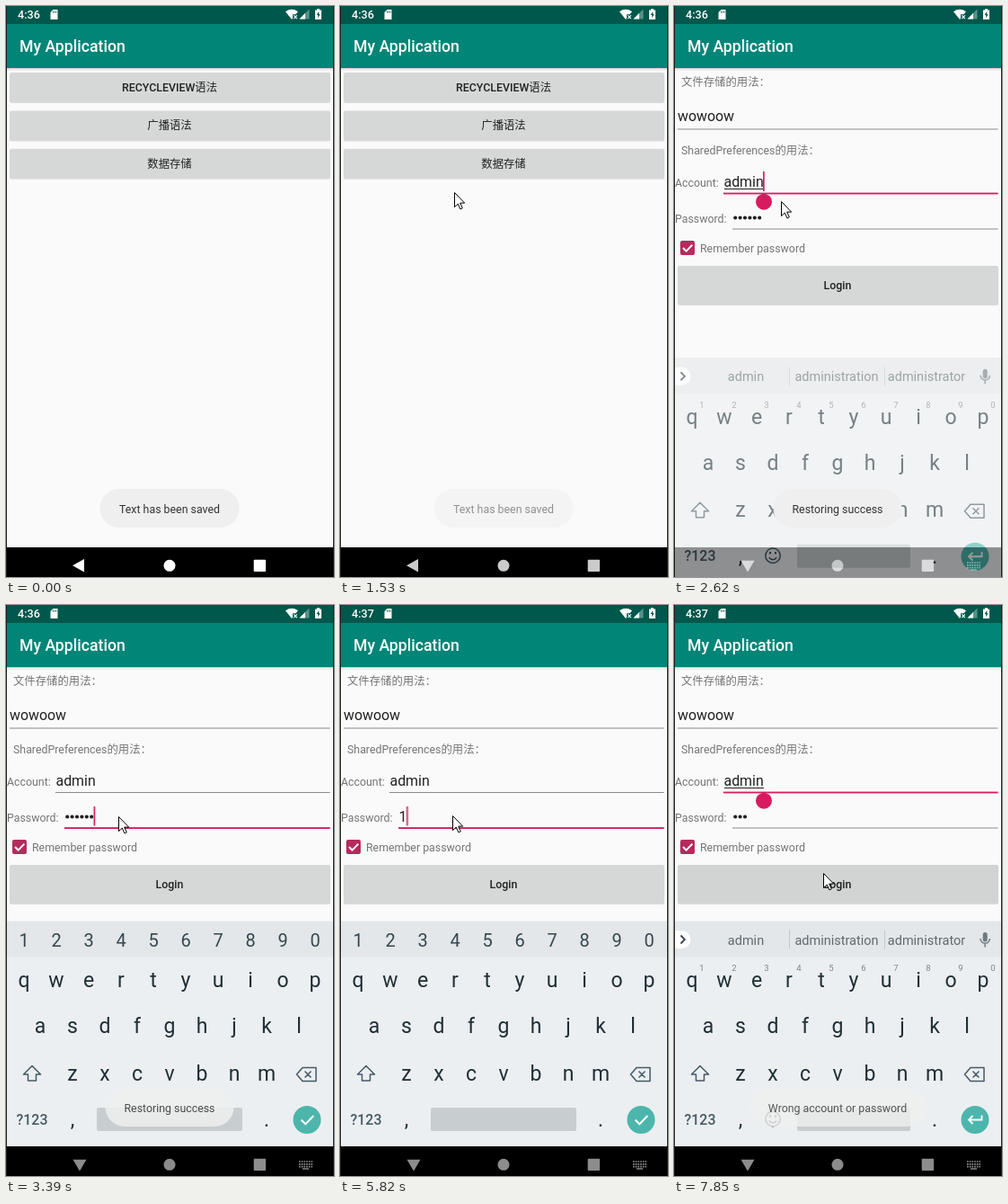
Recreate the animation shown at these times as an HTML page. Size 365 px wide and 635 px high, loop 8000 ms.

```html
<!DOCTYPE html>
<html lang="zh">
<head>
<meta charset="utf-8">
<title>Login form</title>
<style>
html, body { margin: 0; width: 365px; height: 635px; overflow: hidden; background: #000; }
svg { display: block; }
text { font: 12.36px Roboto, "Noto Sans CJK SC", "Noto Sans CJK JP", "Noto Sans CJK", sans-serif; fill: #212121; white-space: pre; }
.mid { text-anchor: middle; }
.med { font-weight: 500; }
.label { fill: #757575; }
.input { font-size: 15.9px; }
.title { font-size: 17.66px; font-weight: 500; fill: #fff; }
.clock { font-size: 12.6px; font-weight: 500; fill: #fff; }
.key { font-size: 23px; fill: #1f2f36; text-anchor: middle; }
.num { font-size: 20px; fill: #37474f; text-anchor: middle; }
.hint { font-size: 9.5px; fill: #78878e; text-anchor: middle; }
.word { font-size: 14.5px; fill: #5f6a6f; text-anchor: middle; }
.mode { font-size: 15.9px; font-weight: 500; fill: #455a64; text-anchor: middle; }
.pink { fill: #d81b60; }
.rule { fill: #8a8a8a; }
.icon { fill: none; stroke: #455a64; stroke-width: 1.5; stroke-linejoin: round; }
.toast rect { fill: #efefef; }
.toast text { fill: #333; text-anchor: middle; }
</style>
</head>
<body>
<svg width="365" height="635" viewBox="0 0 365 635">
  <defs>
    <g id="bar">
      <rect y="20" width="365" height="582" fill="#fafafa"/>
      <rect y="69" width="365" height="1" opacity=".16"/>
      <rect y="70" width="365" height="2" opacity=".05"/>
      <rect y="20" width="365" height="49" fill="#008577"/>
      <text class="title" x="15" y="51">My Application</text>
    </g>
    <path id="grip" class="pink" d="M0 0L6.3 3.2A9 9 0 1 1 -6.3 3.2Z"/>
  </defs>

  <g id="home">
    <use href="#bar"/>
    <g id="menu"></g>
    <rect id="menuPress" x="4" y="159" width="357" height="33" rx="2" opacity="0"/>
  </g>

  <g id="login">
    <use href="#bar"/>
    <text class="label" x="8" y="89">文件存储的用法：</text>
    <text class="input" x="4" y="128">wowoow</text>
    <rect class="rule" x="4" y="136.5" width="356.5" height="1"/>
    <text class="label" x="8" y="164.5">SharedPreferences的用法：</text>

    <text class="label" x="1" y="201">Account:</text>
    <text class="input" x="55.5" y="201">admin</text>
    <rect class="rule" x="55" y="208" width="305.5" height="1"/>
    <rect id="accFocus" class="pink" x="55" y="207.6" width="305.5" height="1.8"/>

    <text class="label" x="1" y="241">Password:</text>
    <path d="M68.2 235.5h27.1" fill="none" stroke="#212121" stroke-width="4.2" stroke-linecap="round" stroke-dasharray="0 5.4"/>
    <rect id="cover" y="229" width="50" height="14" fill="#fafafa"/>
    <g id="digit"><text id="digitPos" class="input" y="241">1</text></g>
    <rect class="rule" x="65" y="247.5" width="295.5" height="1"/>
    <rect id="pwFocus" class="pink" x="65" y="247.2" width="295.5" height="1.8"/>
    <g id="pwCaret"><rect id="pwCaretPos" class="pink" x="-.4" y="224" width="1.7" height="21.5"/></g>

    <rect x="7" y="261" width="16" height="16" rx="2" fill="#b52b5e"/>
    <path d="M10 269l3.6 3.6 6.8-7" fill="none" stroke="#fff" stroke-width="2"/>
    <text class="label" x="29" y="274">Remember password</text>

    <rect x="4" y="290" width="357" height="43" rx="2" opacity=".13"/>
    <rect x="4" y="289" width="357" height="42.5" rx="2" fill="#d6d7d7"/>
    <text class="mid med" x="182" y="314.5">Login</text>
    <rect id="loginPress" x="4" y="289" width="357" height="42.5" rx="2" opacity="0"/>

    <g id="accEdit">
      <rect x="56" y="203" width="44" height="1" fill="#212121"/>
      <use href="#grip" x="100" y="208"/>
    </g>
    <rect id="accCaret" class="pink" x="99" y="184" width="1.7" height="22"/>
    <g id="pwGrip"><use href="#grip" x="98" y="247.5"/></g>
  </g>

  <rect width="365" height="20" fill="#00574b"/>
  <text id="early" class="clock" x="13" y="14">4:36</text>
  <text id="late" class="clock" x="13" y="14">4:37</text>
  <g fill="#fff">
    <path d="M52.5 4H57.5V15H49.5V7Z"/>
    <path d="M52.5 5.5v2.2M54.2 5.5v2.2M55.9 5.5v2.2" stroke="#00574b" stroke-width=".8"/>
    <path d="M311 6.2Q318 1.5 325 6.2L322.6 9.2H319V13.8L318 15Z"/>
    <path d="M320.3 10.3l3.6 3.8M323.9 10.3l-3.6 3.8" stroke="#fff" stroke-width="1.1"/>
    <path d="M326.5 14.5L337.5 3.5V14.5Z" opacity=".35"/>
    <path d="M326.5 14.5L333 8V14.5Z"/>
    <path d="M344 4.6H346V3.2H349V4.6H351V15H344Z"/>
    <path d="M348.2 6L345.6 10H347.2V13.2L349.6 9.2H348.2Z" fill="#00574b"/>
  </g>

  <rect y="602" width="365" height="33"/>
  <g id="nav" fill="#fff">
    <path id="back" d="M74 622.3L87 615V629.6Z"/>
    <g id="down">
      <path d="M74.5 616.8H89.5L82 629.4Z"/>
      <path d="M326 619H341M326 621.8H341M326 624.6H341" fill="none" stroke="#fff" stroke-width="1.7" stroke-dasharray="1.7 1"/>
      <path d="M330 627h7" stroke="#fff" stroke-width="1.4"/>
    </g>
    <circle cx="182" cy="622.3" r="6.5"/>
    <rect x="275.7" y="615.7" width="13.4" height="13.4" rx="1"/>
  </g>

  <g id="keyboard">
    <rect y="352" width="365" height="250" fill="#eceff1"/>
    <rect y="351.5" width="365" height="40" fill="#e3e7e9"/>
    <g id="letters"></g>
    <path class="icon" d="M29 512.5L38.5 522H33.5V529H24.5V522H19.5Z"/>
    <path class="icon" d="M330 514.5H345V529.5H330L323.5 522ZM332.5 518.5l7 7M339.5 518.5l-7 7"/>
    <circle cx="335" cy="572.5" r="15.5" fill="#4db6ac"/>
    <g id="textKeys">
      <path d="M0 362H8.5A10 10 0 0 1 8.5 382H0Z" fill="#fff"/>
      <path d="M7.5 367.5l4.5 4.5-4.5 4.5" fill="none" stroke="#37474f" stroke-width="1.8"/>
      <path d="M128.5 361.5v21M234.5 361.5v21" stroke="#c3c9cc"/>
      <g id="words"></g>
      <rect x="343.7" y="364" width="5" height="10.5" rx="2.5" fill="#6f7b80"/>
      <path d="M341 371a5.2 5.2 0 0 0 10.4 0M346.2 376.5v4" fill="none" stroke="#6f7b80" stroke-width="1.5"/>
      <circle class="icon" cx="110" cy="571.5" r="8.2"/>
      <path class="icon" d="M105.8 573.5q4.2 5.2 8.4 0"/>
      <path d="M107 567.2v2.6M113 567.2v2.6" stroke="#455a64" stroke-width="2"/>
      <rect x="137" y="559" width="126" height="26" rx="2" fill="#c8cdcf"/>
      <path d="M342.5 567.5V572.5H328M332.5 568l-4.5 4.5 4.5 4.5" fill="none" stroke="#fff" stroke-width="1.8"/>
    </g>
    <g id="numKeys">
      <rect x="101" y="559" width="162" height="26" rx="2" fill="#c8cdcf"/>
      <path d="M328.5 572.5l4.8 4.8 9-9.3" fill="none" stroke="#fff" stroke-width="2"/>
    </g>
  </g>

  <path d="M.5 0V635M364.5 0V635" stroke="#1c1c1c"/>

  <g id="saved" class="toast"><rect x="104.5" y="537" width="155" height="43" rx="21.5"/><text x="182" y="563.5">Text has been saved</text></g>
  <g id="restored" class="toast"><rect x="110.5" y="537" width="143" height="43" rx="21.5"/><text x="182" y="563.5">Restoring success</text></g>
  <g id="wrong" class="toast"><rect x="83.5" y="537" width="197" height="43" rx="21.5"/><text x="182" y="563.5">Wrong account or password</text></g>

  <g id="mouse">
    <circle id="tap" r="15" fill="#ff0" opacity=".5"/>
    <path d="M.5 .5V16.6L4.3 13.1 6.9 18.9 9.3 17.8 6.7 12.1H11.7Z" fill="#fff" stroke="#000"/>
  </g>
</svg>
<script>
const LOOP = 8000;
const fill = (id, html) => document.getElementById(id).insertAdjacentHTML('beforeend', html);
const label = (cls, x, y, s) => `<text class="${cls}" x="${x}" y="${y}">${s}</text>`;
const row = (cls, x, y, chars) => [...chars].map((c, i) => label(cls, x + 36 * i, y, c)).join('');

fill('menu', ['RECYCLEVIEW语法', '广播语法', '数据存储'].map((s, i) => {
  const y = 74 + 42.4 * i;
  const styled = s.replace(/[A-Z]+/, m => `<tspan class="med">${m}</tspan>`);
  return `<rect x="4" y="${y + 1}" width="357" height="33" rx="2" opacity=".13"/>
    <rect x="4" y="${y}" width="357" height="32.5" rx="2" fill="#d6d7d7"/>` + label('mid', 182, y + 21, styled);
}).join(''));

fill('letters', row('key', 20, 425, 'qwertyuiop') + row('key', 38, 476, 'asdfghjkl') +
  row('key', 74, 528.5, 'zxcvbnm') + label('mode', 29, 577.5, '?123') +
  label('key', 74, 580, ',') + label('key', 290, 580, '.'));
fill('words', label('word', 80, 377.5, 'admin') + label('word', 181, 377.5, 'administration') +
  label('word', 281, 377.5, 'administrator') + row('hint', 31, 407, '1234567890'));
fill('numKeys', row('num', 20, 380, '1234567890'));

// Keyframes are keyed by milliseconds.
let css = '';
function track(id, ease, keys) {
  const body = Object.entries(keys).map(([ms, rule]) => `${ms / LOOP * 100}%{${rule}}`).join('');
  css += `@keyframes ${id}{${body}}#${id}{animation:${id} ${LOOP}ms ${ease} infinite}`;
}
const map = (keys, fn) => Object.fromEntries(Object.entries(keys).map(([ms, v]) => [ms, fn(v)]));
const fade = (id, keys) => track(id, 'linear', map(keys, v => `opacity:${v}`));
const jump = (id, keys) => track(id, 'step-end', map(keys, x => `transform:translateX(${x}px)`));
// Hidden at first; every time given flips the visibility.
function show(id, ...times) {
  const keys = { 0: 'visibility:hidden' };
  times.forEach((ms, i) => keys[ms] = `visibility:${i % 2 ? 'hidden' : 'visible'}`);
  track(id, 'step-end', keys);
}

track('login', 'ease-out', {
  0: 'opacity:0;transform:translateY(24px)', 1640: 'opacity:0;transform:translateY(24px)',
  2000: 'opacity:1;transform:none', 8000: 'opacity:1;transform:none'
});
track('keyboard', 'linear', {
  0: 'opacity:0;transform:translateY(56px)', 2500: 'opacity:0;transform:translateY(56px)',
  2620: 'opacity:.6;transform:translateY(40px)', 2780: 'opacity:1;transform:none',
  8000: 'opacity:1;transform:none'
});
track('mouse', 'ease-in-out', map({
  0: [303, 640], 70: [303, 632], 840: [130, 175], 1300: [130, 175], 1530: [127, 207],
  1800: [127, 207], 2120: [119, 198], 2300: [119, 198], 2620: [119, 217], 2900: [125, 235],
  5580: [125, 235], 5660: [125, 234], 6370: [125, 234], 6680: [142, 191], 7200: [142, 191],
  7410: [166, 298], 8000: [166, 298]
}, ([x, y]) => `transform:translate(${x}px,${y}px)`));
show('tap', 1080, 1230, 2150, 2240, 2960, 3080, 6690, 6830, 7410, 7530);

fade('saved', { 0: 1, 1390: 1, 1690: 0, 8000: 0 });
fade('restored', { 0: 0, 1950: 0, 2250: 1, 3350: 1, 3640: 0, 8000: 0 });
fade('wrong', { 0: 0, 7640: 0, 7850: .8, 8000: .8 });
fade('menuPress', { 0: 0, 1080: 0, 1200: .1, 1300: .1, 1520: 0, 8000: 0 });
fade('loginPress', { 0: 0, 7410: 0, 7530: .1, 7850: .015, 8000: .015 });
fade('nav', { 0: 1, 70: 1, 1530: .8, 2620: .75, 3000: .55, 8000: .55 });
show('back', 0, 2540);
show('down', 2540);
show('early', 0, 4600);
show('late', 4600);
show('textKeys', 0, 3200, 6900);
show('numKeys', 3200, 6900);

show('accFocus', 2200, 3060, 6740);
show('accEdit', 2250, 3060, 6900);
show('accCaret', 2250, 2750, 6900, 7400);
show('pwFocus', 3060, 6830);
show('pwGrip', 3600, 4250);
show('pwCaret', 3150, 3650, 4100, 5630, 5820, 6830);
show('digit', 5820, 6900);

const DOT = 5.4, DIGIT = 8.9, at = n => 65.5 + DOT * n;
const erased = { 0: at(6), 4100: at(5), 4350: at(4), 4600: at(3), 4820: at(2), 4900: at(1), 5130: at(0) };
jump('cover', { ...erased, 6210: at(1), 6450: at(2), 6900: at(3) });
jump('digitPos', { 0: at(0), 6210: at(1), 6450: at(2) });
jump('pwCaretPos', { ...erased, 5820: at(0) + DIGIT, 6210: at(1) + DIGIT, 6450: at(2) + DIGIT });

document.head.appendChild(document.createElement('style')).textContent = css;
</script>
</body>
</html>
```
